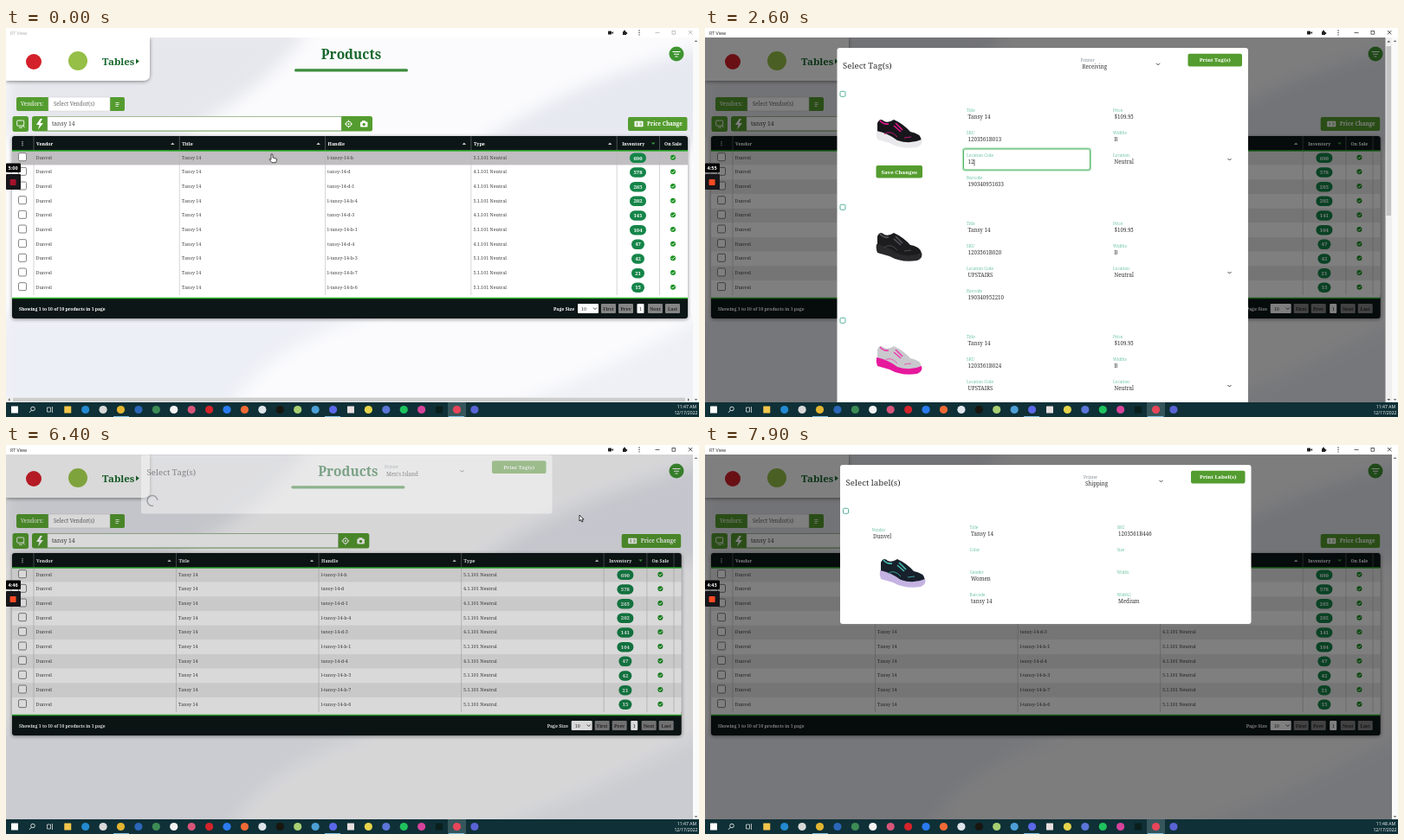
An HTML page that plays this animation: 800 by 450 pixels, repeating every 8 s.

```html
<!DOCTYPE html>
<html lang="en">
<head>
<meta charset="utf-8">
<title>Product table</title>
<style>
html, body { margin: 0; width: 100%; height: 100%; overflow: hidden; background: #fff; }
svg { display: block; width: 100%; height: 100%; }
text { font-family: "Noto Serif", serif; white-space: pre; }
.ui { font-family: "Open Sans", "Noto Sans", sans-serif; }
</style>
</head>
<body>
<svg viewBox="0 0 800 450">
  <defs>
    <filter id="soft" x="-20%" y="-20%" width="140%" height="140%"><feGaussianBlur stdDeviation="9"/></filter>
    <filter id="shade" x="-10%" y="-10%" width="120%" height="130%"><feDropShadow dx="0" dy="1" stdDeviation="2" flood-opacity=".45"/></filter>
    <clipPath id="page"><rect y="11" width="793" height="422"/></clipPath>
  </defs>
  <g id="scene"></g>
</svg>
<script>
const LOOP = 8000, STEP = 100;
const GREEN = '#549c2f', DARK = '#17672c', MINT = '#6cc5a2';
const VENDOR = 'Dunvel', TITLE = 'Tansy 14', QUERY = 'tansy 14';
const ROWS = [
  ['l', 'b', 690], ['', 'd', 578], ['', 'd-1', 265], ['l', 'b-4', 202], ['', 'd-3', 141],
  ['l', 'b-1', 104], ['', 'd-4', 47], ['l', 'b-3', 42], ['l', 'b-7', 21], ['l', 'b-6', 15]
];
const TAGS = [
  ['1203561B013', '190340951633', '#17171b', '#e9e9ec', '#e5178d'],
  ['1203561B020', '190340952210', '#1c1c1e', '#29292b', '#55565a'],
  ['1203561B024', '190340952234', '#c9c9cd', '#e6189c', '#f03cae']
];
const ICONS = ['#fff', '', '', '#f3c64b', '#2489d0', '#d9d9d9', '#e3b532', '#2b66b8', '#3d8b54', '#f4f4f4',
  '#d8557a', '#d5232b', '#2b7bf0', '#f06a35', '#dfe5ea', '#191510', '#a8cf72', '#4d9fd6', '#5a68e8',
  '#e8dfe0', '#e6d44c', '#5b76d8', '#1fc25c', '#d7439b', '#0a1f1c', '#e9455a', '#5a63d4'];
// time, x, y, shape
const CURSOR = [
  [0, 308, 150, 'hand'], [600, 308, 150, ''], [3400, 300, 156, 'arrow'], [3700, 160, 77, 'arrow'],
  [4000, 160, 77, 'arrow'], [4300, 160, 208, 'arrow'], [4600, 277, 251, 'arrow'], [5000, 277, 251, 'arrow'],
  [5500, 588, 38, 'arrow'], [5900, 588, 38, 'arrow'], [6300, 662, 81, 'arrow'], [6600, 662, 81, 'arrow'],
  [7100, 330, 150, 'hand'], [7400, 330, 150, '']
];

const scene = document.getElementById('scene');
const clamp = v => Math.max(0, Math.min(1, v));
const rect = (x, y, w, h, fill, r = 0, more = '') =>
  `<rect x="${x}" y="${y}" width="${w}" height="${h}" rx="${r}" fill="${fill}" ${more}/>`;
const dot = (x, y, r, fill, more = '') => `<circle cx="${x}" cy="${y}" r="${r}" fill="${fill}" ${more}/>`;
const line = (d, color, w = 1, more = '') => `<path d="${d}" fill="none" stroke="${color}" stroke-width="${w}" ${more}/>`;
const shape = (d, fill, more = '') => `<path d="${d}" fill="${fill}" ${more}/>`;
const text = (x, y, s, size, fill, more = '') =>
  `<text x="${x}" y="${y}" font-size="${size}" fill="${fill}" ${more}>${s}</text>`;
const MID = 'text-anchor="middle"', BOLD = 'font-weight="700"';
const label = (x, y, s, size, fill = '#fff') => text(x, y, s, size, fill, `${MID} ${BOLD}`);
const at = (x, y, body, more = '') => `<g transform="translate(${x} ${y})" ${more}>${body}</g>`;
const chevron = (x, y) => line(`M${x - 2} ${y - 1}l2 2 2-2`, '#333', .9);
const tick = (x, y) => line(`M${x - 1.6} ${y}l1.2 1.3 2.2-2.6`, '#fff', .9);

function titleBar(focused) {
  const c = focused ? '#222' : '#aaa';
  return rect(0, 0, 800, 11, '#fff') + text(5, 7.6, 'RT View', 5.3, c, 'class="ui"') +
    rect(695, 3.5, 4, 4, '#222', .6) + shape('M699 5.5l2-1.5v3z', '#222') +
    rect(712, 4, 4, 4, '#222', .5) + dot(714, 3.6, 1, '#222') + dot(716.3, 6, 1, '#222') +
    [3, 5.4, 7.8].map(y => dot(731, y, .65, '#222')).join('') +
    line('M749.5 5.5h5', c, .7) + rect(769, 3.6, 3.6, 3.6, 'none', 0, `stroke="${c}" stroke-width=".7"`) +
    line('M788 3l4.4 4.4m0-4.4l-4.4 4.4', c, .8);
}

function backdropArt() {
  return rect(0, 11, 800, 422, '#fbfbfd') + `<g filter="url(#soft)" clip-path="url(#page)">` +
    shape('M150 0H350Q300 75 190 128H0V50Z', '#e6e7ed') +
    shape('M810 20Q640 65 545 135H810Z', '#e7e9f1') +
    shape('M-10 330H430Q300 365 255 445H-10Z', '#edeff6') +
    shape('M560 445Q690 400 810 330V445Z', '#eef0f6') + '</g>';
}

function toolbar(cut) {
  const end = 387 - cut / 2, mid = 398.5 - cut / 2, price = 718 - cut;
  return `<g filter="url(#shade)">${shape('M0 11H166V53q0 8-8 8H0Z', '#fff')}</g>` +
    dot(32, 39, 9, '#d3202a') + dot(83, 38, 11, '#95bf47') +
    text(111, 42.5, 'Tables', 11.4, DARK, BOLD) + shape('M150 35.5l3.8 3-3.8 3z', DARK) +
    text(mid, 35.5, 'Products', 15.4, DARK, `${MID} font-weight="600"`) +
    rect(mid - 65.5, 47.2, 131, 3.2, '#3b8b3c', 1.5) +
    dot(774, 30, 8.5, '#3f9431') + line('M769.5 27.5h9M771 30.3h6M772.5 33h3', '#fff', 1.1) +
    rect(12, 80, 125, 16, GREEN, 2) + rect(49, 80, 71, 16, '#fff', 0, 'stroke="#ccc" stroke-width=".5"') +
    text(17, 90.3, 'Vendors:', 6.3, '#fff') + text(55, 90.3, 'Select Vendor(s)', 6.2, '#666') +
    line('M126.5 86.5h4M126.5 88.5h4M126.5 90.5h3', '#fff', .8) +
    rect(7.5, 102, 18.5, 18, GREEN, 2.5) + rect(12.7, 107, 8, 6.2, 'none', 1, 'stroke="#fff" stroke-width=".9"') +
    line('M15 115.2h4m0-3l2.5 3', '#fff', .9) +
    rect(30, 102, end + 6, 17.5, GREEN, 2.5) + rect(48, 102.7, end - 48, 16, '#fff', 0, 'stroke="#bbb" stroke-width=".5"') +
    shape('M39.5 105l-4.5 7h3.5l-1.5 5.5 6-7.500h-3.700l2.700-5z', '#fff') +
    text(53, 113.2, QUERY, 6.7, '#444') +
    dot(end + 8.5, 111, 3, 'none', 'stroke="#fff" stroke-width="1"') + dot(end + 8.5, 111, 1, '#fff') +
    line(`M${end + 8.5} 106.500v2m0 5v2m-4.500-4.500h2m5 0h2`, '#fff', .9) +
    rect(end + 22, 108.500, 8.500, 6, '#fff', 1) + rect(end + 24, 107.200, 4, 2, '#fff') + dot(end + 26.200, 111.500, 1.700, GREEN) +
    rect(price, 103, 68.500, 16, GREEN, 2) + rect(price + 7.500, 107.800, 10, 6.500, '#fff', .8) +
    line(`M${price + 10.500} 109v4m3-3h2.500m-2.500 2h2.500`, GREEN, .9) +
    text(price + 22, 113.3, 'Price Change', 6.2, '#fff', 'font-weight="600"');
}

function table(cut, hover, striped) {
  const right = 787 - cut, colW = 168.3 - cut * .515;
  const cols = [0, 1, 2, 3].map(i => 32 + i * colW);
  const inv = 705.2 - cut * 2.06, sale = 754.5 - cut * 2, pill = 729.5 - cut * 2, check = 770 - cut * 2;
  let s = `<g filter="url(#shade)">${rect(7, 125, right - 7, 211, '#111213', 3)}</g>` + rect(7, 142, right - 7, 170, '#fff');
  s += [132, 134, 136].map(y => dot(19, y - .3, .6, '#fff')).join('');
  ['Vendor', 'Title', 'Handle', 'Type'].forEach((name, i) => {
    s += text(cols[i] + 3, 135.7, name, 5.3, '#fff', BOLD);
    const x = cols[i] + colW - 8;
    s += shape(`M${x - 2.2} 135l2.200-2.600 2.200 2.600z`, '#ccc');
  });
  s += text(inv + 6, 135.7, 'Inventory', 5.2, '#fff', BOLD) + label(check, 135.7, 'On Sale', 5.2) +
    shape(`M${sale - 9.500} 132.500l2.200 2.600 2.200-2.600z`, '#3f9c43');
  ROWS.forEach(([prefix, suffix, count], i) => {
    const y = 142 + i * 16.66, base = y + 9.700;
    const fill = hover && !i ? '#c0bec0' : striped && i % 2 === 0 ? '#ececec' : '#fff';
    const handle = `${prefix ? prefix + '-' : ''}tansy-14-${suffix}`;
    s += rect(7, y, right - 7, 16.66, fill) +
      rect(14.500, y + 2.700, 9, 9, '#fff', 1.500, 'stroke="#666" stroke-width=".8"');
    [VENDOR, TITLE, handle, `${prefix ? 5 : 4}.1.101 Neutral`].forEach((v, c) => {
      s += text(cols[c] + 2.5, base, v, 5.4, '#444');
    });
    const w = count > 99 ? 19 : 15;
    s += rect(pill - w / 2, y + 2.600, w, 11.500, '#158549', 5.700) + label(pill, y + 10.500, count, 6) +
      dot(check, y + 7.700, 3, '#16901f') + tick(check, y + 7.700);
  });
  [...cols, inv, sale, ...(cut ? [771] : [])].forEach(x => {
    s += line(`M${x} 142V309`, '#b9b9b9', .6) + line(`M${x} 125V142`, '#777', .6);
  });
  s += line(`M7 142H${right}M7 312.500H${right}`, '#2fb52f', 1.300);
  s += text(15, 326.5, 'Showing 1 to 10 of 10 products in 1 page', 5, '#fff', 'font-weight="600"');
  const buttons = [['First', 687], ['Prev', 707], ['Next', 741], ['Last', 761]].map(([name, x]) =>
    rect(x, 319, 17, 11, '#858585', 1) + label(x + 8.5, 326.500, name, 5.2, '#292929')).join('');
  return s + at(-cut, 0, text(632, 326.500, 'Page Size', 5.2, '#fff', BOLD) + rect(660, 319, 24, 11, '#fff', 1) +
    text(664, 326.500, '10', 5.4, '#333') + chevron(680, 324.500) + buttons +
    rect(728.500, 319, 8, 11, '#fff', 1) + text(732.500, 326.500, '1', 5.4, '#333', MID));
}

function shoe(x, y, upper, sole, accent) {
  return at(x, y,
    shape('M1 8Q4 1 9 6Q14 8 20 4Q31 9 39 18Q51 20 52 28Q38 35 23 28Q9 24 1 19Z', upper) +
    shape('M0 17Q14 20 24 28Q39 33 52 27Q54 33 47 36Q29 39 15 31L1 27Q-1 22 0 17Z', sole) +
    line('M4 5Q8 10 14 9M22 8l8 8M20 11l8 7', accent, 1.6) + line('M9 21Q16 15 24 24M32 25l8-1', accent, .8));
}

const button = (x, y, w, h, s) => rect(x, y, w, h, GREEN, 2) + label(x + w / 2, y + h / 2 + 2.3, s, 6.1);

const field = (x, y, name, value, boxed) =>
  (boxed ? rect(x - 2, y - 8, x < 400 ? 144 : 146, 23.5, '#fff', 2) : '') +
  text(x, y, name, 4.6, MINT) + text(x + 1.5, y + 8, value, 6.2, '#333');

function checkbox(y, checked, focused) {
  const glow = focused ? rect(154.5, y - 4.500, 9, 9, '#a9dfbd', 2) : '';
  return glow + rect(156, y - 3, 6, 6, checked ? '#219044' : '#fff', 1.2, 'stroke="#45a890" stroke-width=".9"') +
    (checked ? tick(158.8, y) : '');
}

function tagCard(i, t) {
  const [sku, barcode, upper, sole, accent] = TAGS[i];
  const y = i * 131, on = t >= [3700, 4300, Infinity][i], dx = on ? 1 : 0;
  const focus = !i && t >= 2000 && t < 3500, edited = !i && t >= 2300;
  let code = 'UPSTAIRS';
  if (edited) code = '12-345'.slice(0, [2400, 2500, 2800, 2900, 3100, 3200].filter(k => t >= k).length);
  let s = checkbox(76.3, on, on && (i === 1 || t < 4300));
  if (on) s += rect(165.5, 71, 456, 128, '#e8f7ea', 2, 'stroke="#b9cfc2" stroke-width=".9"') +
    rect(194, 89.500, 63, 63, '#fff', 1);
  s += shoe(198 + dx, 102, upper, sole, accent);
  if (focus) s += rect(298, 139.500, 147, 25, '#fff', 2.5, 'stroke="#b8e6c1" stroke-width="2.6"') +
    rect(298.500, 140, 146, 24, '#fff', 2, 'stroke="#3dac58" stroke-width=".9"');
  s += field(302 + dx, 97, 'Title', TITLE, on) + field(302 + dx, 123, 'SKU', sku, on) +
    field(302 + dx, 149, 'Location Code', code, on) + field(302 + dx, 175, 'Barcode', barcode, on) +
    field(471 - dx * 2 + dx, 97, 'Price', '$109.95', on) + field(471 - dx, 123, 'Widths', 'B', on) +
    field(471 - dx, 149, 'Location', 'Neutral', on) + chevron(605.5 - dx * 1.5, 152);
  if (focus && (edited || t % 500 < 300)) {
    s += line(`M${304 + code.length * (code === 'UPSTAIRS' ? 4.1 : 3.45)} 152v7.500`, '#222', .7);
  }
  if (edited) s += button(197.5 + dx, 159, 53.5, 14.500, 'Save Changes');
  return at(0, y, s);
}

function labelCard() {
  const left = [['Title', TITLE], ['Color', ''], ['Gender', 'Women'], ['Barcode', QUERY]];
  const right = [['SKU', '1203561B446'], ['Size', ''], ['Width', ''], ['Width2', 'Medium']];
  const column = (x, list) => list.map(([n, v], i) => field(x, 97 + i * 26, n, v)).join('');
  return checkbox(76.3) + field(189, 99.500, 'Vendor', VENDOR) + column(302, left) + column(472, right) +
    shoe(198.500, 128, '#17202b', '#c4b3e2', '#46bcb1');
}

function modal(t, vis) {
  const tags = t < 7000, loaded = tags ? t >= 600 && t < 6300 : t >= 7600;
  const scroll = tags && loaded;
  const height = loaded ? (tags ? 420 : 184) : tags ? 68 : 52;
  const printer = tags ? (loaded ? 'Receiving' : "Men's Island") : 'Shipping';
  const kind = tags ? 'Tag' : 'Label';
  let s = rect(152.5, 23, 474.5, height, '#fff', 3) +
    text(159, 46.500, `Select ${tags ? 'Tag' : 'label'}(s)`, 9.7, '#333') +
    text(433.5, 39, 'Printer', 4.8, '#85919a') + text(435.5, 47.2, printer, 6.2, '#333') + chevron(523, 41.800) +
    button(557.5, 29.700, 62.500, 14.800, `Print ${kind}(s)`);
  if (!loaded && tags) s += dot(165.500, 76, 6, 'none',
    `stroke="#777" stroke-width="1.5" stroke-dasharray="28 10" transform="rotate(${t * .8} 165.5 76)"`);
  if (loaded) s += tags ? TAGS.map((_, i) => tagCard(i, t)).join('') : labelCard();
  const bar = scroll ? rect(785.500, 11, 7.500, 422, '#efefef') + rect(786.500, 21, 5.500, 196, '#c3c3c3') +
    shape('M787.300 16.500l2-2 2 2zM787.300 429l2 2 2-2z', '#555') : '';
  return bar + at(scroll ? 0 : 3.5, -20.8 * (1 - vis), s, `opacity="${vis}"`);
}

function windowScroll(wide) {
  let s = rect(793, 11, 7, 422, '#fafafa') + shape('M794.500 16l2-2 2 2zM794.500 429l2 2 2-2z', '#777');
  if (wide) s += rect(0, 427, 793, 6, '#f1f1f1') + rect(8, 427.700, 776, 4.600, '#cdcdcd') +
    shape('M4.500 428l-2 2 2 2zM787 428l2 2-2 2z', '#666');
  return s;
}

function recorder(t) {
  const left = Math.ceil(300 - t * .0022);
  const time = `${Math.floor(left / 60)}:${String(left % 60).padStart(2, '0')}`;
  return rect(0, 156.500, 17, 10.500, '#050505', 1) +
    text(8, 164, time, 5.6, '#fff', `class="ui" ${MID} ${BOLD}`) +
    rect(0, 169, 17, 18, '#17161a', 1) + rect(4.600, 175, 7, 7, t < STEP ? '#a3122c' : '#fb4a24', .8);
}

function taskbar(t) {
  let s = rect(0, 433, 800, 17, '#0e3036') + rect(510, 433, 21, 17, '#35565b');
  ICONS.forEach((color, i) => {
    const x = 10 + i * 20.42;
    if (color) s += i === 0 || i === 3 || i === 19 || i === 24 ? rect(x - 4, 437.500, 8, 8, color, .5) : dot(x, 441.500, 4.600, color);
  });
  s += dot(31, 440.500, 2.300, 'none', 'stroke="#fff" stroke-width=".8"') + line('M29.300 442.300l-2.300 2.500', '#fff', .9) +
    line('M47.500 439h4v5h-4zM53.500 438v7', '#ddd', .8);
  [133, 377, 520].forEach(x => { s += rect(x - 9, 449, 18, 1, '#79bbdd'); });
  const end = 'class="ui" text-anchor="end"';
  return s + text(797, 440, `11:${t >= 7600 ? 48 : 47} AM`, 5.1, '#fff', end) + text(798.500, 447.300, '12/17/2022', 5.1, '#fff', end);
}

function cursor(t) {
  const next = CURSOR.findIndex(k => k[0] > t);
  const a = CURSOR.at(next < 0 ? -1 : next - 1), b = CURSOR[next] || a;
  if (!a[3]) return '';
  const p = b === a ? 0 : (t - a[0]) / (b[0] - a[0]), e = p * p * (3 - 2 * p);
  const body = a[3] === 'hand'
    ? shape('M-2-4q1.500-1 2 1v3l4 1.200q1 .5.5 2l-1 2.500h-4.500l-3-3.500q0-1.500 2 0z', '#fff', 'stroke="#222" stroke-width=".8"')
    : shape('M0 0v7l1.600-1.500 1.200 2.500 1.300-.6-1.200-2.400h2.200z', '#fff', 'stroke="#111" stroke-width=".8"');
  return at(a[1] + (b[1] - a[1]) * e, a[2] + (b[2] - a[2]) * e, body);
}

function visibility(t) {
  if (t < 6300) return clamp((t - 200) / 150);
  return t < 7000 ? clamp((6480 - t) / 180) : clamp((t - 7370) / 165);
}

function render(t) {
  const vis = visibility(t), cut = vis > 0 ? 7.3 : 0;
  const hover = !vis && (t < 300 || t >= 7000);
  scene.innerHTML = backdropArt() + toolbar(cut) + table(cut, hover, t >= STEP) +
    (vis ? rect(0, 11, 793, 422, '#000', 0, `opacity="${.5 * vis ** 1.5}"`) : '') +
    windowScroll(!vis) + (vis ? modal(t, vis) : '') +
    titleBar(t >= STEP) + recorder(t) + taskbar(t) + cursor(t);
}

let shown = -1;
const start = performance.now();
function tickFrame(now) {
  const t = Math.floor((Math.max(0, now - start) % LOOP) / STEP) * STEP;
  if (t !== shown) render(shown = t);
  requestAnimationFrame(tickFrame);
}
render(shown = 0);
requestAnimationFrame(tickFrame);
</script>
</body>
</html>
```
